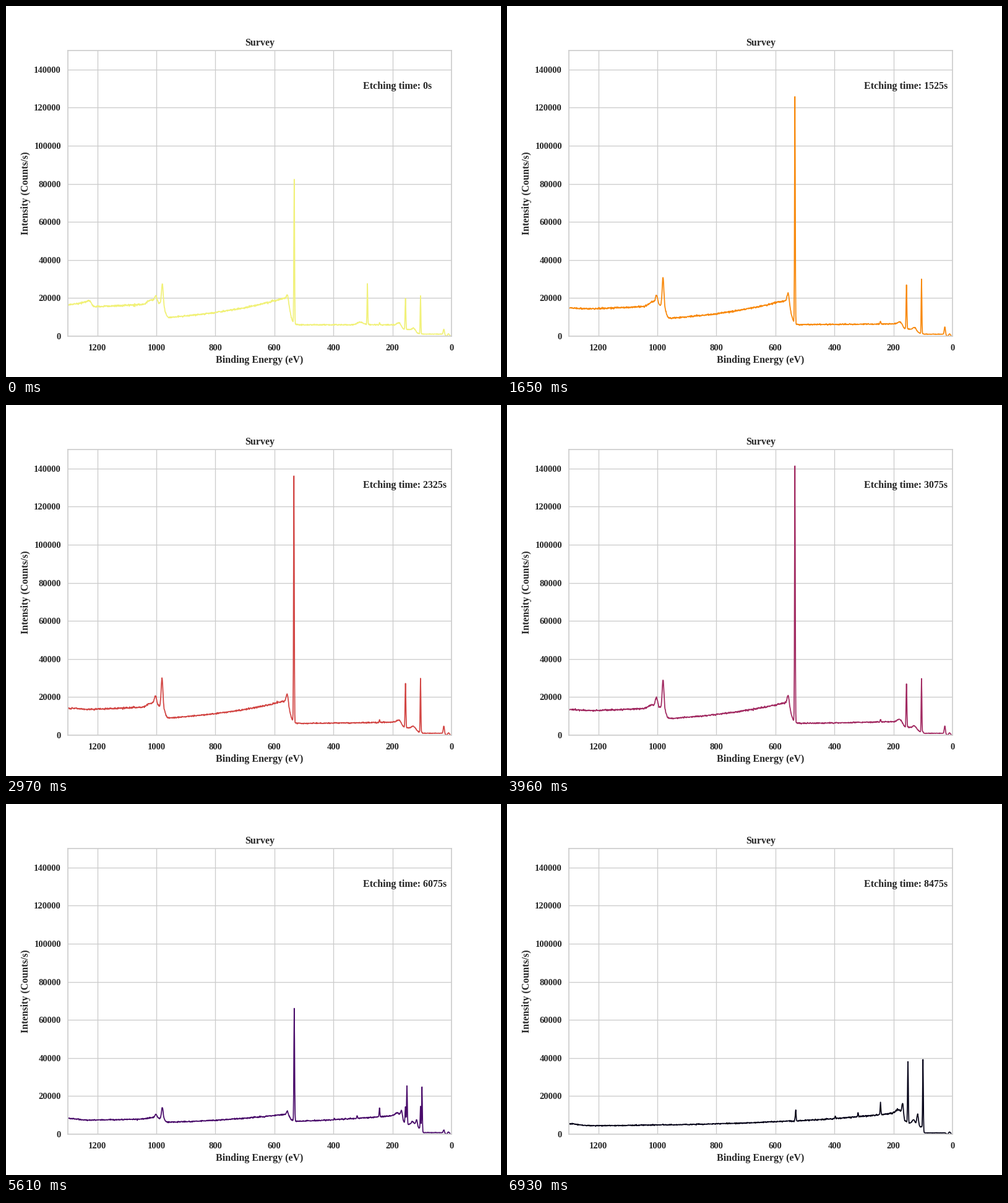
A matplotlib script that plays this animation: 800x600 px, repeating every 7.26 s.

```python
import numpy as np
import matplotlib.pyplot as plt
from matplotlib.animation import FuncAnimation

FRAMES, INTERVAL = 22, 330
PT = 0.72  # points per pixel at 100 dpi

plt.rcParams.update({
    "font.family": "Liberation Serif", "font.weight": "bold",
    "axes.titleweight": "bold", "axes.labelweight": "bold",
    "font.size": 16 * PT, "axes.titlesize": 16 * PT, "axes.labelsize": 16 * PT,
    "text.color": ".15", "axes.labelcolor": ".15",
    "xtick.color": ".15", "ytick.color": ".15",
    "axes.edgecolor": ".8", "axes.linewidth": 1.667 * PT,
    "grid.color": ".8", "grid.linewidth": 1.333 * PT,
    "lines.solid_capstyle": "round",
})

energy = np.arange(1298, 0, -1.0)


def peak(centre, width, height):
    return height * np.exp(-0.5 * ((energy - centre) / width) ** 2)


def edge(centre, width, height, decay=np.inf):
    """Loss step above a binding energy, fading towards higher energies."""
    x = energy - centre
    return height * np.exp(-x / decay) / (1 + np.exp(-x / width))


# Intensities are in 100 counts/s.
LOW_END = edge(22, 1.5, 7) + peak(10, 3, 12)

OXIDE_BASE = (LOW_END + edge(22, 1.5, 4) + edge(120, 4, 24) + edge(169, 3, 25)
              + peak(128, 5, 10) + peak(178, 6, 12)
              + edge(548, 5, 150, 300) + edge(971, 3, 78)
              + peak(1018, 12, 22) + edge(1265, 12, 8))
BULK_BASE = (LOW_END + edge(99, 1, 31) + edge(115, 2, 22, 400)
             + edge(165, 4, 60, 400) + peak(133, 4, 18) + peak(184, 8, 15)
             + edge(1265, 12, 12))

OXIDE_LINES = (peak(26, 2, 38) + peak(105, 1.1, 287) + peak(156, 1.3, 230)
               + peak(244, 1.2, 14))
BULK_LINES = (peak(100, 1.1, 362) + peak(118, 2.5, 50) + peak(151, 1.2, 328)
              + peak(169, 2.5, 60) + peak(244, 1.2, 64) + peak(320, 1.2, 22)
              + peak(397, 1, 15) + peak(531, 1.1, 55))
SURFACE = (peak(285, 1.1, 216) + peak(308, 10, 14)
           + edge(1221, 2.5, 42, 45))


def oxygen_lines(frame, shift):
    """The strong oxygen line and its satellites; the strong one grows."""
    return (peak(534 + shift, 1.15, 1080 + 23 * frame)
            + peak(557 + shift, 3.5, 50)
            + peak(981 + shift, 2.8, 150) + peak(1003 + shift, 4, 47))


def spectrum(frame):
    surface = np.exp(-0.9 * frame)
    oxide = 1 / (1 + np.exp((frame - 16.6) / 0.95))
    cover = oxide * (1 - 0.018 * frame)
    signal = oxide * (1 - 0.3 * surface)
    shift = -np.round(surface + 1.5 * (1 - oxide))

    y = cover * OXIDE_BASE + (1 - cover) * BULK_BASE + surface * SURFACE
    y += (1 - oxide) * BULK_LINES
    y += signal * (OXIDE_LINES + oxygen_lines(frame, shift))
    noise = np.random.default_rng(frame + 40).normal(size=energy.size)
    counts = 100 * y
    return np.maximum(counts + 1.8 * np.sqrt(np.minimum(counts, 2e4)) * noise, 0)


def etching_time(frame):
    """Etch steps are even within each stage of the run."""
    stages = [0, 1, 5, 9, 12, 15, 17, 21]
    seconds = [0, 325, 1525, 2325, 3075, 4275, 6075, 8475]
    return round(np.interp(frame, stages, seconds))


fig, ax = plt.subplots(figsize=(8, 6), dpi=100, facecolor="white")
fig.subplots_adjust(left=0.125, right=0.9, bottom=0.11, top=0.88)
ax.set_axisbelow(True)
ax.grid(True)
ax.set(xlim=(1300, 0), ylim=(0, 150000),
       xticks=range(0, 1201, 200), yticks=range(0, 140001, 20000))
ax.tick_params(length=0, labelsize=14.67 * PT)
ax.tick_params(axis="x", pad=12.67 * PT)
ax.tick_params(axis="y", pad=11 * PT)
ax.set_title("Survey", pad=8 * PT)
ax.set_xlabel("Binding Energy (eV)", labelpad=5.33 * PT)
ax.set_ylabel("Intensity (Counts/s)", labelpad=5.33 * PT)
line, = ax.plot([], [], lw=1.75 * PT)
label = ax.text(300, 130000, "")
inferno = plt.get_cmap("inferno")


def update(frame):
    line.set_data(energy, spectrum(frame))
    line.set_color(inferno(1 - (frame + 1) / (FRAMES + 1)))
    label.set_text(f"Etching time: {etching_time(frame)}s")
    return line, label


anim = FuncAnimation(fig, update, frames=FRAMES, interval=INTERVAL,
                     repeat=True, repeat_delay=0)
plt.show()
```
